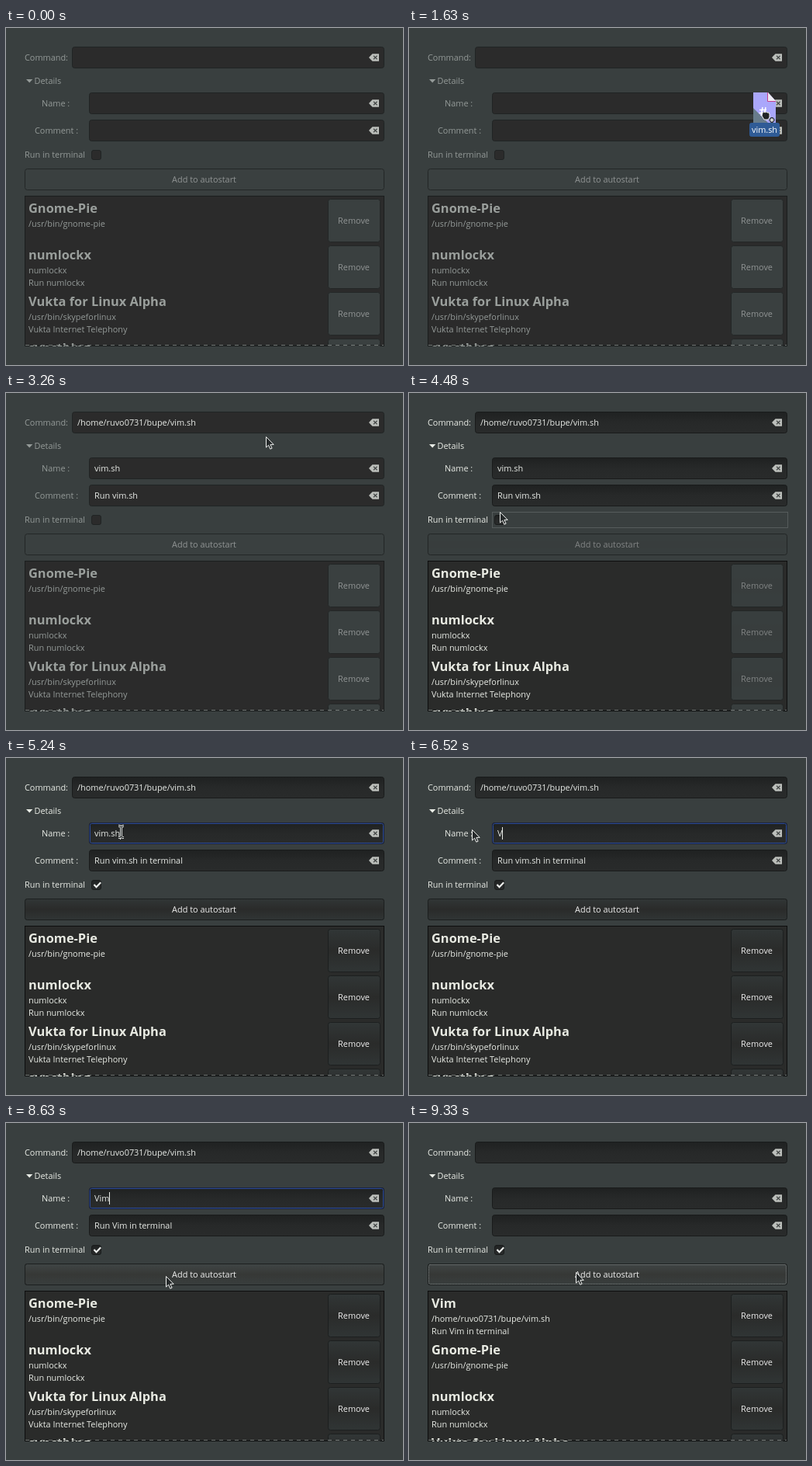
An HTML page for the animation above (9490 ms loop, 512x434 px).

```html
<!DOCTYPE html>
<html lang="en">
<head>
<meta charset="utf-8">
<title>Autostart editor</title>
<style>
html, body { margin: 0; width: 100%; height: 100%; overflow: hidden; background: #393f3f; }
svg { display: block; width: 100vw; height: 100vh; --glow: 0; --btn: .44; --ink: #949a98; --head: #9a9f9c; }
svg.active { --ink: #e9ece6; --head: #e8eae2; }
text { font: 500 10.9px "Open Sans", "Noto Sans", sans-serif; fill: var(--ink); white-space: pre; }
text.head { font-size: 16.4px; font-weight: 700; fill: var(--head); }
text.value, text.file { fill: #e8ebe7; }
text.btn { fill: #fff; fill-opacity: var(--btn); text-anchor: middle; }
text.file { text-anchor: middle; fill: #fff; }
.box { fill: #2b2b2b; stroke: #202424; }
.active .box { fill: url(#well); stroke: #191b1b; }
.flat { fill: #3a4040; stroke: #232727; }
.gloss { fill: url(#gloss); stroke: #1c1f1f; opacity: var(--glow); }
.list { fill: #2b2b2b; stroke: #1b1e1e; }
.active .list { fill: #2a2b2a; stroke: #0d0e0e; }
.tick { fill: none; stroke: #eef0ee; stroke-width: 2.1; }
</style>
</head>
<body>
<script>
const LOOP = 9490, STEP = 40;
const NS = "http://www.w3.org/2000/svg";

function el(tag, attrs, parent, content) {
  const node = document.createElementNS(NS, tag);
  for (const key in attrs) node.setAttribute(key, attrs[key]);
  if (content) node.textContent = content;
  if (parent) parent.append(node);
  return node;
}
const svg = el("svg", { viewBox: "0 0 512 434" }, document.body);
const group = (attrs = {}, parent = svg) => el("g", attrs, parent);
const path = (d, attrs, parent = svg) => el("path", { d, ...attrs }, parent);
const text = (x, y, content, cls = "", parent = svg) => el("text", { x, y, class: cls }, parent, content);
const rect = (x, y, w, h, attrs, parent = svg) =>
  el("rect", { x: x + .5, y: y + .5, width: w - 1, height: h - 1, ...attrs }, parent);
const show = (node, on) => node.setAttribute("visibility", on ? "visible" : "hidden");

const defs = el("defs", {}, svg);
function gradient(id, ...colors) {
  const g = el("linearGradient", { id, x1: 0, y1: 0, x2: 0, y2: 1 }, defs);
  colors.forEach((c, i) => el("stop", { offset: i / (colors.length - 1), "stop-color": c }, g));
}
gradient("well", "#1f2121", "#272929", "#292b2b");
gradient("gloss", "#313636", "#2a2b2a", "#303535");
gradient("hover", "#404545", "#363836", "#393e3e");
el("rect", { x: 24, y: 216, width: 464, height: 194 }, el("clipPath", { id: "view" }, defs));

function entry(x, y) {
  rect(x, y, 488 - x, 28, { rx: 3, class: "box" });
  const under = group();
  const value = text(x + 7, y + 18, "", "value");
  const cy = y + 14;
  path(`M468 ${cy}l4.5 -4.8h8.5v9.6h-8.5z`, { fill: "#bcbfbb" });
  path(`M474 ${cy - 2.3}l4.6 4.6m0 -4.6l-4.6 4.6`, { stroke: "#474a49", "stroke-width": 1.3 });
  return { value, under };
}

function button(x, y, w, h, label, parent) {
  rect(x, y, w, h, { rx: 3, class: "flat" }, parent);
  rect(x, y, w, h, { rx: 3, class: "gloss" }, parent);
  const hover = rect(x, y, w, h, { rx: 3, fill: "url(#hover)", stroke: "#1c1f1f", opacity: 0 }, parent);
  text(x + w / 2 - .5, y + h / 2 + 4, label, "btn", parent);
  return hover;
}

// Form
text(24, 42, "Command:");
const command = entry(85, 24);
path("M26 66h8.4l-4.2 4.6z", { fill: "var(--ink)" });
text(36.5, 72, "Details");
text(46, 101, "Name :");
const name = entry(107, 83);
text(37, 136, "Comment :");
const comment = entry(107, 118);
text(24, 167, "Run in terminal");
rect(110, 157, 13, 13, { rx: 2.5, class: "box" });
const tick = path("M113.5 163l3 3.2 5.7 -6", { class: "tick" });
const checkFocus = rect(107, 153, 382, 21, { fill: "none", stroke: "#737979", "stroke-dasharray": "1 1" });
const addHover = button(24, 181, 464, 28, "Add to autostart", svg);
const addFocus = rect(25, 182, 462, 26, { rx: 2, fill: "none", stroke: "#8a9090", "stroke-dasharray": "1 1" });

const dropRing = el("rect", { x: 86, y: 25, width: 401, height: 26, rx: 3, fill: "none", stroke: "#55a80b", "stroke-width": 2 }, svg);
const dropCaret = path("M93.5 30v16", { stroke: "#a5a9a5" });
const nameRing = group();
rect(107, 83, 381, 28, { rx: 3, fill: "none", stroke: "#1a2444" }, nameRing);
rect(108, 84, 379, 26, { rx: 2, fill: "none", stroke: "#2d4a90" }, nameRing);
const caret = path("M0 89v16", { stroke: "#e8ebe7" });
const mark = el("rect", { y: 89, height: 16, fill: "#215d9c" }, name.under);

// List
const view = group({ "clip-path": "url(#view)" });
rect(24, 216, 464, 194, { class: "list" }, view);
const rows = group({}, view);
const script = "/home/ruvo0731/bupe/vim.sh";
[
  ["Vim", script, "Run Vim in terminal"],
  ["Gnome-Pie", "/usr/bin/gnome-pie", ""],
  ["numlockx", "numlockx", "Run numlockx"],
  ["Vukta for Linux Alpha", "/usr/bin/skypeforlinux", "Vukta Internet Telephony"],
  ["syncthing", "", ""]
].forEach(([title, cmd, note], i) => {
  const y = 216 + 60 * i;
  text(29, y + 22, title, "head", rows);
  text(29, y + 40, cmd, "", rows);
  text(29, y + 56, note, "", rows);
  button(415, y + 4, 68, 56, "Remove", rows);
});
path("M25 408.5h462", { stroke: "#242727" }, view);
path("M25 408.5h462", { stroke: "#727775", "stroke-dasharray": "5 5" }, view);

// Dragged file
const file = group();
path("M355 5h19l10 11v30h-29z", { fill: "#aaa7fb" }, file);
path("M355 25l21 21h-21z", { fill: "#687c8b" }, file);
path("M374 5v11h10z", { fill: "#eceaf2" }, file);
path("M373.5 5v11.5h10.5", { fill: "none", stroke: "#c2408c" }, file);
path("M367 24l-2 11m6 -11l-2 11m-6 -7.5h9m-9.5 4h9", { fill: "none", stroke: "#fff", "stroke-width": 1.5 }, file);
rect(350, 44, 39, 18, { rx: 2, fill: "#2f5b96", stroke: "#2f5b96" }, file);
text(369.5, 57, "vim.sh", "file", file);
path("M367 31q2 -2 3 0q2 -2 3 0q3 -1 3 2v4l-2 3h-5l-3 -5z", { fill: "#202425", stroke: "#f2f2f2" }, file);
path("M379 37v7m-3.5 -3.5h7", { stroke: "#23282a", "stroke-width": 3.4 }, file);
path("M379 38v5m-2.5 -2.5h5", { stroke: "#fff", "stroke-width": 1.3 }, file);

// Pointer
const arrow = path("M-.5 -.5v13.6l3.1 -2.9 2.2 5 2.3 -1 -2.2 -4.8h4.3z", { fill: "#25292a", stroke: "#eef0ee" });
const beam = group();
const beamPath = "M-3.5 -7.5q3.5 0 3.5 2v11q0 2 -3.5 2m7 -15q-3.5 0 -3.5 2m0 11q0 2 3.5 2";
path(beamPath, { fill: "none", stroke: "#eef0ee", "stroke-width": 3 }, beam);
path(beamPath, { fill: "none", stroke: "#222627", "stroke-width": 1.2 }, beam);

// Timing
const easeIn = u => u * u;
const easeOut = u => 1 - (1 - u) ** 2;
const smooth = u => u * u * (3 - 2 * u);
// start, end, x, y, easing
const moves = [
  [3040, 3240, 336, 57, easeIn],
  [3280, 3540, 199, 147, easeOut],
  [3900, 4360, 118, 154, smooth],
  [4850, 5190, 148, 95, smooth],
  [5270, 5590, 82, 93, smooth],
  [7860, 8400, 206, 198, smooth],
  [8630, 8830, 216, 193, smooth]
];
const commandText = [[0, ""], [2560, script], [9160, ""]];
const nameText = [[0, ""], [2600, "vim.sh"], [6520, "V"], [6900, "Vi"], [7060, "Vim"], [9160, ""]];
const commentText = [
  [0, ""], [2640, "Run vim.sh"], [4640, "Run vim.sh in terminal"], [6590, "Run V in terminal"],
  [6940, "Run Vi in terminal"], [7100, "Run Vim in terminal"], [9160, ""]
];

const at = (table, t) => table.filter(row => row[0] <= t).pop()[1];
const within = (t, a, b) => t >= a && t < b;

// Stepped progress; the first step already moves.
function progress(t, a, b) {
  if (t < a) return 0;
  if (t >= b) return 1;
  return Math.min(1, (Math.floor((t - a) / STEP) + 1) * STEP / (b - a + STEP));
}

function pointerAt(t) {
  let x = 371, y = 36;
  for (const [a, b, tx, ty, ease] of moves) {
    const u = ease(progress(t, a, b));
    x += (tx - x) * u;
    y += (ty - y) * u;
  }
  return [Math.round(x), Math.round(y)];
}

const inEntry = (x, y) => x < 488 &&
  (x > 85 && y > 23 && y < 52 || x > 107 && (y > 82 && y < 111 || y > 117 && y < 149));

function render(t) {
  const active = t >= 4440;
  const glow = progress(t, 4480, 4800);
  svg.classList.toggle("active", active);
  svg.style.setProperty("--glow", glow);
  svg.style.setProperty("--btn", active ? .3 + .62 * glow : .44);

  command.value.textContent = at(commandText, t);
  name.value.textContent = at(nameText, t);
  comment.value.textContent = at(commentText, t);

  const dragging = within(t, 1550, 2520);
  const left = 1 - easeOut(progress(t, 1550, 2030));
  const dx = Math.round(150 * left), dy = Math.round(131 * left);
  file.setAttribute("transform", `translate(${dx} ${dy})`);
  show(file, dragging);
  const over = dragging && 30 + dy < 52 && 371 + dx < 488;
  show(dropRing, over || within(t, 2520, 2560));
  show(dropCaret, over);

  const [x, y] = pointerAt(t);
  const typing = inEntry(x, y);
  arrow.setAttribute("transform", `translate(${x} ${y})`);
  beam.setAttribute("transform", `translate(${x + .5} ${y})`);
  show(arrow, t >= 2520 && !typing);
  show(beam, t >= 2520 && typing);

  show(tick, t >= 4600);
  show(checkFocus, within(t, 4440, 5230));

  const focused = within(t, 5230, 9040);
  const selecting = within(t, 5270, 6520);
  const end = 114 + name.value.getComputedTextLength();
  const from = Math.max(114, Math.min(end, x));
  show(nameRing, focused);
  show(mark, selecting);
  mark.setAttribute("x", from);
  mark.setAttribute("width", end - from);
  show(caret, focused && !selecting);
  caret.setAttribute("transform", `translate(${Math.round(end) + .5} 0)`);

  let hover = progress(t, 8280, 8400);
  if (t >= 9040) hover = .25 + .75 * progress(t, 9160, 9330);
  addHover.setAttribute("opacity", hover);
  show(addFocus, t >= 9040);
  rows.setAttribute("transform", `translate(0 ${t >= 9200 ? 0 : -60})`);
}

const begin = performance.now();
function tickFrame() {
  render((performance.now() - begin) % LOOP);
  requestAnimationFrame(tickFrame);
}
tickFrame();
</script>
</body>
</html>
```
